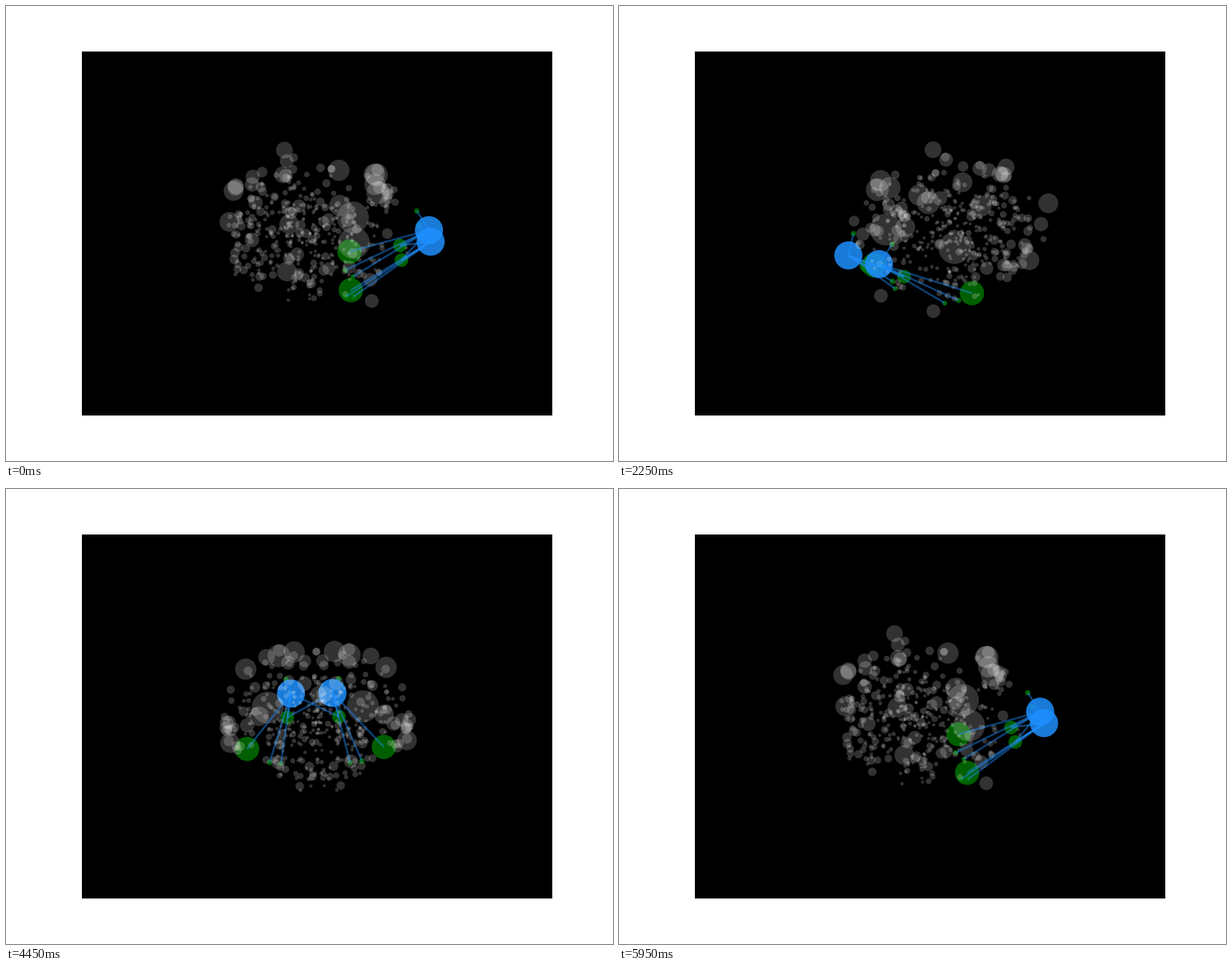
Animation of 800x600 px, one loop 6 s. Source, as a matplotlib script:

```python
import numpy as np
import matplotlib.pyplot as plt
from matplotlib.animation import FuncAnimation
from matplotlib.collections import LineCollection

FRAMES, INTERVAL, DPI = 120, 50, 100
DIST, ELEV = 10.0, np.radians(20)
MIDPLANE = -0.026  # left/right symmetry plane
CENTER, AXES = np.array([-0.035, 0, -0.01]), np.array([0.39, 0.38, 0.415])
PAIRS = 190

# One hemisphere only: front-back, offset from midplane, height, radius in px
HUB = [(0.420, 0.085, -0.049, 18.5)]
TARGETS = [
    (0.106, 0.274, -0.238, 16),
    (0.306, 0.105, -0.141, 9),
    (0.371, 0.107, 0.048, 3.5),
    (0.119, 0.139, -0.327, 3.2),
    (0.089, 0.185, -0.308, 3.6),
]
LANDMARKS = [
    (0.118, 0.190, -0.017, 21),
    (-0.361, 0.237, 0.112, 13),
    (0.062, 0.276, 0.212, 14),
    (0.210, 0.140, 0.232, 15),
    (0.200, 0.080, 0.255, 14),
    (-0.140, 0.345, -0.110, 13),
    (-0.155, 0.200, 0.346, 11),
    (0.190, 0.147, -0.348, 9),
]


def mirror(half):
    """Stack the far hemisphere, then the near one."""
    far, near = np.array(half, float), np.array(half, float)
    far[:, 1] = MIDPLANE - far[:, 1]
    near[:, 1] = MIDPLANE + near[:, 1]
    return np.vstack([far, near])


def regions(rng, n):
    """Fill half an ellipsoid; nodes grow toward its surface and top."""
    way = rng.normal(size=(n, 3))
    way /= np.linalg.norm(way, axis=1, keepdims=True)
    way[:, 1] = np.abs(way[:, 1])
    rho = rng.random(n) ** 0.45
    pos = CENTER + AXES * way * rho[:, None]
    radius = 2 + 10 * rho ** 3 * rng.random(n) * (0.8 + 0.35 * way[:, 2])
    return np.column_stack([pos, radius])


def project(nodes, azim):
    u, d, z = nodes[:, :3].T
    c, s = np.cos(azim), np.sin(azim)
    right, near = u * c - d * s, d * c + u * s
    up = z * np.cos(ELEV) - near * np.sin(ELEV)
    depth = DIST - near * np.cos(ELEV) - z * np.sin(ELEV)
    return np.column_stack([right / depth, up / depth])


rng = np.random.default_rng(7)
hubs, targets = mirror(HUB), mirror(TARGETS)
brain = mirror(np.vstack([LANDMARKS, regions(rng, PAIRS)]))

# Each hub reaches its own side, and the second target on both sides
k = len(TARGETS)
pairs = [(h, h * k + t) for h in range(2) for t in range(k)]
pairs += [(0, k + 1), (1, 1)]

fig = plt.figure(figsize=(8, 6), dpi=DPI, facecolor="white")
ax = fig.add_axes([0.125, 0.1, 0.775, 0.8], facecolor="black")
ax.set(xlim=(-0.095, 0.09), ylim=(-0.095, 0.09), xticks=[], yticks=[])
for spine in ax.spines.values():
    spine.set_visible(False)


def dots(nodes, color, alpha, order):
    xy = project(nodes, 0)
    return ax.scatter(xy[:, 0], xy[:, 1], s=(nodes[:, 3] * 144 / DPI) ** 2,
                      c=color, alpha=alpha, linewidths=0, zorder=order)


groups = [
    (targets, dots(targets, "green", 0.75, 1)),
    (hubs, dots(hubs, "dodgerblue", 0.85, 2)),
    (brain, dots(brain, "white", 0.2, 3)),
]
links = LineCollection([], colors="dodgerblue", linewidths=1.8, alpha=0.45, zorder=4)
ax.add_collection(links, autolim=False)


def update(i):
    azim = 2 * np.pi * i / FRAMES
    for nodes, art in groups:
        art.set_offsets(project(nodes, azim))
    a, b = project(hubs, azim), project(targets, azim)
    links.set_segments([(a[h], b[t]) for h, t in pairs])
    return [art for _, art in groups] + [links]


anim = FuncAnimation(fig, update, frames=FRAMES, interval=INTERVAL,
                     repeat=True, repeat_delay=0)
plt.show()
```
